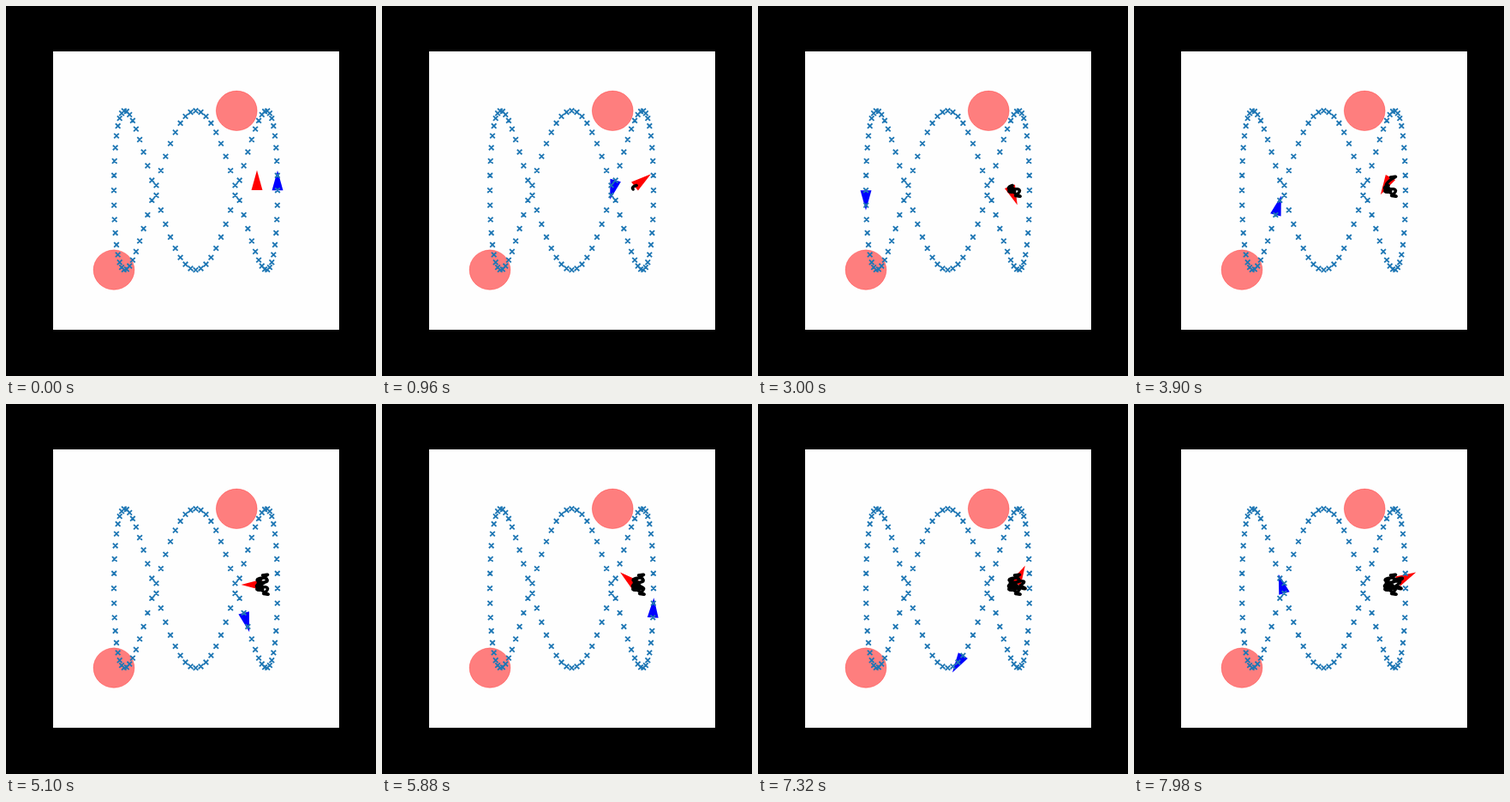
Animation of 432x432 px, one loop 8 s. Source, as an HTML page:

```html
<!DOCTYPE html>
<html>
<head>
<meta charset="utf-8">
<style>
html, body { margin: 0; width: 100%; height: 100%; overflow: hidden; background: #000; }
svg { display: block; width: 100vw; height: 100vh; }
</style>
</head>
<body>
<svg viewBox="0 0 432 432">
  <rect width="432" height="432" fill="#000"/>
  <rect x="55" y="53" width="334" height="325" fill="#fefefe"/>
  <g id="discs" fill="#f00" fill-opacity=".5" stroke="#f00" stroke-opacity=".3"></g>
  <path id="leader" fill="#00f"/>
  <path id="follower" fill="#f00"/>
  <path id="marks" fill="none" stroke="#1f77b4" stroke-width="1.85"/>
  <path id="trail" fill="none" stroke="#000" stroke-width="3.3" stroke-linecap="round" stroke-linejoin="round"/>
</svg>
<script>
const STEP = 60, LOOP = 8000, LAP = 100;
const SX = 23.88, SY = 23.22, CX = 221.5, CY = 215.2;
const $ = id => document.getElementById(id);
const px = x => CX + x * SX;
const py = y => CY - y * SY;
const fmt = p => p.map(v => v.toFixed(2)).join(' ');

// Leader course: a 1:3 Lissajous curve in plot units
const course = k => {
  const a = 2 * Math.PI * k / LAP;
  return {
    x: 4 * Math.cos(a), y: 4 * Math.sin(3 * a),
    dir: Math.atan2(12 * Math.cos(3 * a), -4 * Math.sin(a))
  };
};

// Follower key poses: step, screen x, screen y, heading in degrees
const poses = [
  [0, 293, 215, 90], [16, 295, 210.5, 37.5], [35, 300.5, 221.5, -18], [65, 299.5, 200, -119],
  [85, 298.5, 211, -180], [111, 306, 212, -261], [133, 308, 207, -333]
];

// Between poses it drifts steadily while weaving from side to side
const follow = i => {
  const n = Math.max(1, poses.findIndex(p => p[0] >= i));
  const a = poses[n - 1], b = poses[n];
  const u = (i - a[0]) / (b[0] - a[0]);
  const [, x, y, deg] = a.map((v, c) => v + (b[c] - v) * u);
  const sway = Math.min(1, i / 30);
  return {
    x: x + 6 * sway * Math.sin(3 * Math.PI * u),
    y: y + 5 * sway * Math.sin(2 * Math.PI * u),
    dir: deg * Math.PI / 180
  };
};

const arrow = (x, y, dir) => {
  const c = Math.cos(dir), s = Math.sin(dir);
  const corner = (f, w) => fmt([x + (f * c - w * s) * SX, y - (f * s + w * c) * SY]);
  return `M${corner(0, .27)}L${corner(1, 0)}L${corner(0, -.27)}Z`;
};

$('discs').innerHTML = [[-4, -4], [2, 4]].map(([x, y]) =>
  `<ellipse cx="${px(x)}" cy="${py(y)}" rx="${SX}" ry="${SY}"/>`).join('');

$('marks').setAttribute('d', Array.from({ length: LAP }, (_, k) => {
  const p = course(k), x = px(p.x), y = py(p.y), r = 2.8;
  return `M${fmt([x - r, y - r])}L${fmt([x + r, y + r])}M${fmt([x - r, y + r])}L${fmt([x + r, y - r])}`;
}).join(''));

const track = Array.from({ length: Math.ceil(LOOP / STEP) }, (_, i) => follow(i));

function draw(t) {
  const i = Math.floor(t / STEP);
  const p = course(i), q = track[i];
  $('leader').setAttribute('d', arrow(px(p.x), py(p.y), p.dir));
  $('follower').setAttribute('d', arrow(q.x, q.y, q.dir));
  const seen = track.slice(6, i + 1).map(s => fmt([s.x, s.y]));
  $('trail').setAttribute('d', seen.length ? 'M' + seen.join('L') : '');
}

const start = performance.now();
function tick() {
  draw((performance.now() - start) % LOOP);
  requestAnimationFrame(tick);
}
tick();
</script>
</body>
</html>
```
